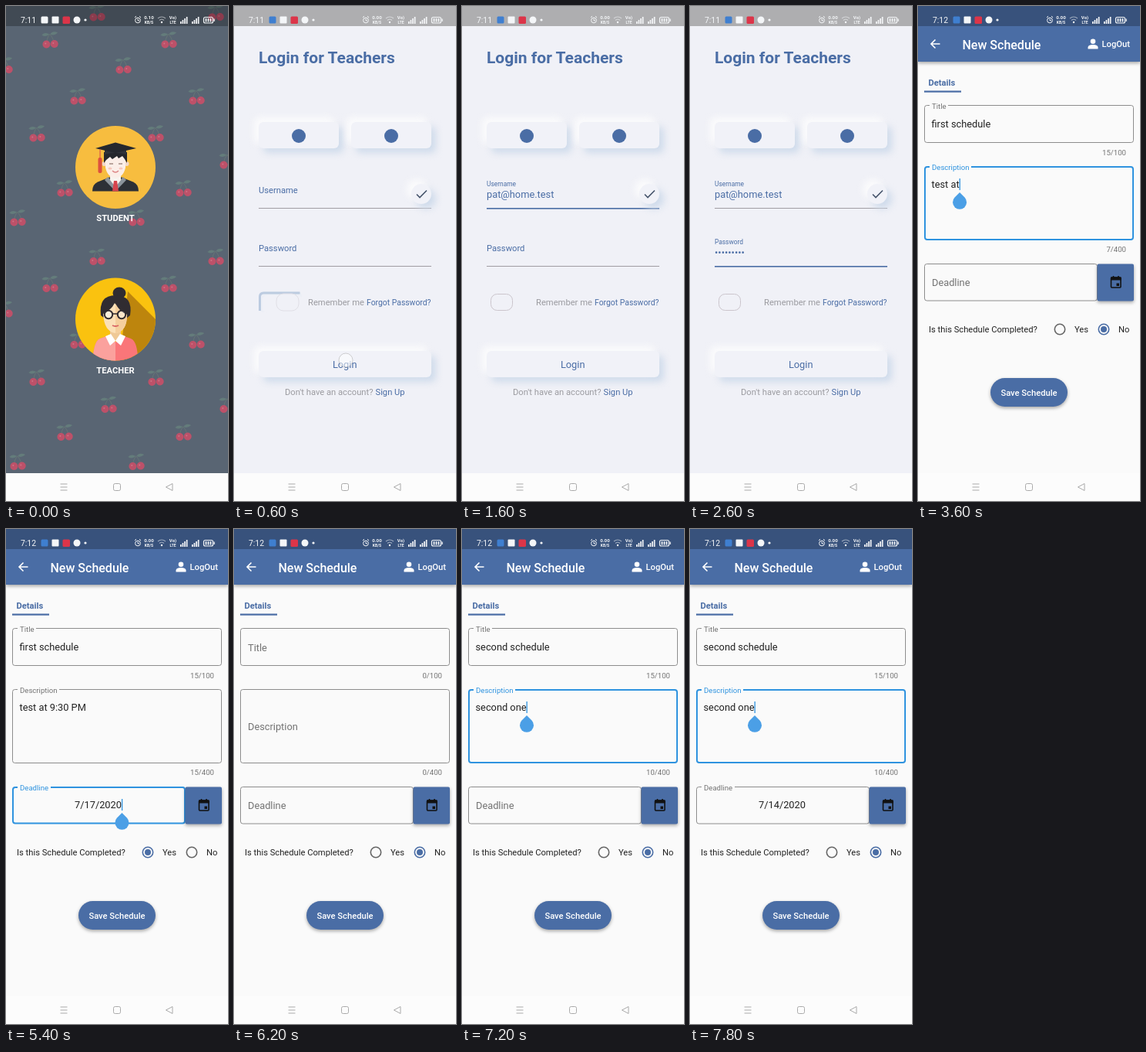
Recreate the animation shown at these times as an HTML page. Size 288 by 640 pixels, loop 8000 ms.

```html
<!DOCTYPE html>
<html lang="en">
<head>
<meta charset="utf-8">
<title>Schedule app demo</title>
<style>
  html, body { margin: 0; width: 100%; height: 100%; overflow: hidden; background: #fafafa; }
  svg { display: block; width: 100vw; height: 100vh; }
  text { font-family: Roboto, sans-serif; white-space: pre; }
  .soft { filter: blur(5px); }
  .lift { filter: drop-shadow(0 2px 2px #0005); }
</style>
</head>
<body>
<svg id="stage" viewBox="0 0 288 640" preserveAspectRatio="none"></svg>
<script>
const STEP = 200, LOOP = 8000;
const BLUE = '#4a6da5', FOCUS = '#2f93df', PICKER = '#2196f3', PAGE = '#fafafa', INK = '#222';

// Each row applies its changes from the given time on.
const TIMELINE = [
  [0, { screen: 'home', clock: '7:11', rate: '0.10' }],
  [400, { touch: true }],
  [600, { screen: 'login', rate: '0.00', toggle: true, user: '', pass: 0 }],
  [800, { touch: false, toggle: false }],
  [1000, { focus: 'user' }],
  [1200, { user: 'pat' }],
  [1400, { user: 'pat@hom' }],
  [1600, { user: 'pat@home.test' }],
  [1800, { focus: 'pass' }],
  [2000, { pass: 3 }],
  [2200, { pass: 6 }],
  [2400, { pass: 9 }],
  [3000, { screen: 'form', clock: '7:12', focus: '', title: '', about: '', date: '', done: false }],
  [3200, { focus: 'title', title: 'first' }],
  [3400, { title: 'first schedule ' }],
  [3600, { focus: 'about', about: 'test at' }],
  [3800, { about: 'test at 9:30' }],
  [4000, { about: 'test at 9:30 PM' }],
  [4200, { focus: 'date', keypad: 433 }],
  [4400, { day: 15, dim: .46, keypad: 469 }],
  [4600, { dim: .54, keypad: 0 }],
  [4800, { day: 17 }],
  [5000, { day: 0, date: '7/17/2020' }],
  [5200, { done: true }],
  [5800, { focus: '', title: '', about: '', date: '', done: false }],
  [6400, { focus: 'title', title: 'second' }],
  [6600, { title: 'second schedule' }],
  [6800, { focus: 'about' }],
  [7000, { about: 'second' }],
  [7200, { about: 'second one' }],
  [7400, { day: 15 }],
  [7600, { day: 14 }],
  [7800, { day: 0, date: '7/14/2020' }]
];

const stateAt = time => Object.assign({}, ...TIMELINE.filter(row => row[0] <= time).map(row => row[1]));

const range = n => [...Array(n).keys()];
const rect = (x, y, w, h, fill, r = 0, more = '') =>
  `<rect x="${x}" y="${y}" width="${w}" height="${h}" rx="${r}" fill="${fill}" ${more}/>`;
const circle = (x, y, r, fill, more = '') => `<circle cx="${x}" cy="${y}" r="${r}" fill="${fill}" ${more}/>`;
const ellipse = (x, y, rx, ry, fill) => `<ellipse cx="${x}" cy="${y}" rx="${rx}" ry="${ry}" fill="${fill}"/>`;
const shape = (d, fill) => `<path d="${d}" fill="${fill}"/>`;
const line = (d, color, width = 1) => `<path d="${d}" fill="none" stroke="${color}" stroke-width="${width}"/>`;
const text = (x, y, size, fill, label, weight = 400, more = '') =>
  `<text x="${x}" y="${y}" font-size="${size}" fill="${fill}" font-weight="${weight}" ${more}>${label}</text>`;
const MIDDLE = 'text-anchor="middle"', END = 'text-anchor="end"';

const pen = document.createElement('canvas').getContext('2d');
pen.font = '12.8px Roboto, sans-serif';
const inputWidth = value => pen.measureText(value).width;

function statusBar({ clock, rate, screen }) {
  const white = '#f4f6f8';
  const bars = x => range(4).map(i => rect(x + i * 2.6, 20 - i * 2, 1.7, 3 + i * 2, white)).join('');
  return text(19, 22, 10.4, white, clock) +
    rect(45.5, 13.5, 9, 9, screen === 'home' ? white : '#3f7fd0', 1.5) +
    rect(59.5, 13.5, 9, 9, white, 1) + rect(73.5, 13.5, 9.5, 9.5, '#dc3549', 1.5) +
    circle(92, 18, 4.5, white) + circle(103, 18, 1.6, white) +
    circle(171, 18.5, 3.4, 'none', `stroke="${white}"`) +
    line('M171 16.5v2.3h2M167 15l2-2M175 15l-2-2', white) +
    text(185.5, 17.4, 6.2, white, rate, 700, MIDDLE) + text(185.5, 23, 5, white, 'KB/S', 700, MIDDLE) +
    line('M197 16q5-4 10 0M199 18.5q3-2.5 6 0', white + '88', 1.2) + circle(202, 21, 1.2, white) +
    text(216.5, 17.4, 6, white, 'Vo)', 700, MIDDLE) + text(216.5, 23, 5, white, 'LTE', 700, MIDDLE) +
    bars(226) + bars(241) +
    rect(256.5, 14.5, 12, 7.5, 'none', 2, `stroke="${white}" stroke-width="1.2"`) +
    rect(269.5, 16.5, 1.3, 3.5, white) + line('M259.5 16v4.5M262.5 16v4.5M265.5 16v4.5', white, 1.7);
}

function navBar(opacity = 1) {
  return rect(0, 604, 288, 36, '#fcfcfc', 0, `opacity="${opacity}"`) +
    line('M70.5 618h9M70.5 622h9M70.5 626h9M216 617.5v9l-8.5-4.5z', '#aaa') +
    rect(139.5, 617.5, 9, 9, 'none', 2, 'stroke="#aaa"');
}

const touchRing = () => circle(145, 458, 9, '#fff8', 'stroke="#aaa8"');

/* Home */

const CHERRY_TILE = [[57, 43], [118, 8], [-2, 76], [93, 116], [40, 164], [133, 199], [76, 235], [15, 273]];

function cherries() {
  const one = (x, y) => `<g transform="translate(${x} ${y + 1.5}) rotate(-5)">` +
    shape('M0-8q-5-4-10 0q5 4 10 0zM1-8q4-5 10-1q-5 4-10 1z', '#647c7b') +
    line('M-4.5 4q0-7 5-12q4 5 4.5 12', '#667575') +
    circle(-5, 4.6, 5, '#bd5169') + circle(5.3, 5, 5, '#bd5169') +
    circle(-6, 3.4, 1, '#cf7485') + circle(4, 3.8, 1, '#cf7485') + '</g>';
  return range(6).map(i => CHERRY_TILE.map(([x, y]) =>
    one(x + i % 3 * 154, y + (i > 2) * 315.5)).join('')).join('');
}

function student() {
  return ellipse(142, 208.5, 52, 53.5, '#f7bd3f') +
    shape('M112 239.5q0-9 7-12l15-6h16l15 6q7 3 7 12z', '#2d3036') +
    shape('M132 221l10 10 10-10 4 4-14 14.5-14-14.5z', '#8b939b') +
    shape('M135 219h14v6l-7 9-7-9z', '#f8f4ef') +
    shape('M140 226h4l2 13.5h-8z', '#d6444d') +
    circle(127.5, 204, 3, '#f3d8c8') + circle(156.5, 204, 3, '#f3d8c8') +
    shape('M129 191h26v18q-3 13-13 13t-13-13z', '#fbeee8') +
    shape('M127 203v-14h30v14l-3-5-3-4-5 3-2-3-6 4-3-3-5 4z', '#25272c') +
    shape('M128 184h28v8q-14-4-28 0z', '#30333a') + shape('M116 184l26-7.5 27 7.5-27 6z', '#25282e') +
    line('M122 185v12', '#d6444d') + rect(119.5, 196, 5, 20, '#dd503e', 2) +
    line('M134 204h5M146 204h5', '#7b5a50', 1.2) + line('M138 213q4 4 8 0', '#d88', 1.4) +
    ellipse(135, 210, 2.5, 1.5, '#f6c8bd') + ellipse(149, 210, 2.5, 1.5, '#f6c8bd');
}

function teacher() {
  const skin = '#fbe0b7', shade = '#efc996', hair = '#302c31';
  return `<clipPath id="disc"><ellipse cx="142" cy="405" rx="52" ry="53.5"/></clipPath><g clip-path="url(#disc)">` +
    rect(90, 351, 104, 108, '#fac20f') + shape('M158 369l48 48v52h-60z', '#bd850d') +
    ellipse(147, 371, 8.5, 7.5, hair) +
    shape('M123 400q-3-26 19-26q23 0 19 26l-5 4h-28z', hair) +
    rect(135, 411, 14, 22, shade) +
    shape('M126 397q10-3 15-13q7 13 16 15q0 22-15 24q-15-2-16-26z', skin) +
    shape('M142 385q7 12 15 14q0 22-15 24z', '#f5cf9c') +
    shape('M113 459q0-25 9-29l14-5 6 10 6-10 14 5q9 4 9 29z', '#fa7679') +
    shape('M113 459q0-25 9-29l14-5 6 10v24z', '#fba19d') +
    shape('M136 424l6 9-7 6-6-12zM148 424l-6 9 7 6 6-12z', '#fff') +
    circle(133, 399, 5.2, '#fff7', `stroke="${hair}" stroke-width="2"`) +
    circle(150, 399, 5.2, '#fff7', `stroke="${hair}" stroke-width="2"`) +
    line('M138 398h7M123 397h5M155 397h5', hair, 1.6) +
    line('M138 413q4 2 8 0', '#d96565', 1.8) + '</g>';
}

function home(s) {
  return rect(0, 0, 288, 640, '#596573') + cherries() + student() + teacher() +
    text(142, 278, 11.2, '#fff', 'STUDENT', 700, MIDDLE) +
    text(142, 475, 11.2, '#fff', 'TEACHER', 700, MIDDLE) +
    rect(0, 0, 288, 26, '#0004') + (s.touch ? touchRing() : '');
}

/* Login */

const LIGHT = '#f0f1f7';

const raised = (x, y, w, h, r) =>
  rect(x + 6, y + 6, w, h, '#cfdbeb', r, 'class="soft"') +
  rect(x - 6, y - 6, w, h, '#fbfbfc', r, 'class="soft"') + rect(x, y, w, h, '#f1f2f8', r);

function loginField(y, label, value, focused) {
  const floating = value || focused;
  return text(32, floating ? y - 29 : y - 20, floating ? 8.4 : 11.2, BLUE, label) +
    text(32, y - 14, 12.8, BLUE, value) +
    rect(32, y - 1, 224, focused ? 1.6 : 1, focused ? BLUE : '#a09da3');
}

function login(s) {
  const toggle = s.toggle
    ? rect(32, 369, 56, 27, '#eceff6', 6) + line('M33.5 394v-18q0-5 5-5h47', '#bccbe0', 3) +
      rect(37, 374, 52, 23, LIGHT, 6) + rect(55, 372, 29, 22, LIGHT, 9, 'stroke="#e0dfe6"')
    : rect(37.5, 372.5, 28, 21, LIGHT, 8, 'stroke="#cbc5cc"');
  return rect(0, 0, 288, 640, LIGHT) + rect(0, 0, 288, 26, '#aeaeb0') +
    text(32, 73.5, 21, BLUE, 'Login for Teachers', 700) +
    raised(32, 150, 104, 34, 6) + circle(84, 168, 9, BLUE) +
    raised(152, 150, 104, 34, 6) + circle(204, 168, 9, BLUE) +
    loginField(262, 'Username', s.user, s.focus === 'user') +
    raised(230, 230, 26, 26, 13) + line('M237 243.5l4 4 9-9', '#46546b', 1.6) +
    loginField(337, 'Password', '•'.repeat(s.pass), s.focus === 'pass') + toggle +
    text(96, 387, 11.2, '#9b9ba0', 'Remember me') + text(172, 387, 10.4, BLUE, 'Forgot Password?') +
    raised(32, 446, 224, 34, 6) + text(143.7, 468, 12.8, BLUE, 'Login', 400, MIDDLE) +
    text(66, 502.5, 11.2, '#9b9ba0', "Don't have an account?") + text(183.5, 502.5, 11.2, BLUE, 'Sign Up') +
    (s.touch ? touchRing() : '');
}

/* Schedule form */

function outlined(y, w, h, label, labelWidth, value, focused) {
  const color = focused ? FOCUS : '#8c8c8c', inset = focused ? 1 : .5;
  const frame = rect(8 + inset, y + inset, w - 2 * inset, h - 2 * inset, 'none', 3,
    `stroke="${color}" stroke-width="${inset * 2}"`);
  return frame + (value || focused
    ? rect(15, y - 2, labelWidth, 5, PAGE) + text(18, y + 5.2, 9.6, focused ? FOCUS : '#737373', label)
    : text(18, y + h / 2 + 5, 12.8, '#737373', label));
}

const caret = (x, y) => rect(x - .5, y - 12, 1.3, 15, FOCUS) +
  shape(`M${x} ${y + 6}l6.5 6.5a9 9 0 1 1-13 0z`, '#4b9fe6');

const radio = (x, on) => circle(x, 418, 6.7, 'none', `stroke="${on ? BLUE : '#666'}" stroke-width="1.6"`) +
  (on ? circle(x, 418, 4, BLUE) : '');

function keypad(top) {
  const rows = ['123', '456', '789', '/0.'];
  const keys = rows.map((row, r) => [...row].map((key, c) =>
    text(37 + c * 71, 35.5 + r * 40.3, 24, '#888', key === '/' ? '/ :' : key, 400, MIDDLE)).join('')).join('');
  return `<g transform="translate(0 ${top})">` + rect(0, 0, 288, 171, PAGE) + keys +
    line('M246 26h10M243 65v4h16v-4M241 107l6-7h13v14h-13zM250 104l6 6M256 104l-6 6', '#888', 1.5) +
    rect(234, 133, 33, 24, '#8fb9ef', 5) + line('M243 145l5 5 9-10', '#fff', 2.5) + '</g>';
}

function picker(day) {
  const date = new Date(2020, 6, day);
  const name = ['Sun', 'Mon', 'Tue', 'Wed', 'Thu', 'Fri', 'Sat'][date.getDay()];
  const colX = i => 37 + i * 35.6;
  const days = range(31).map(i => {
    const x = colX((i + 3) % 7), y = 235 + Math.floor((i + 3) / 7) * 27.4, chosen = i + 1 === day;
    return (chosen ? circle(x, y, 13.6, PICKER) : '') +
      text(x, y + 3.5, 9.6, chosen ? '#fff' : INK, i + 1, 400, MIDDLE);
  }).join('');
  return rect(12, 52, 264, 370, '#0007', 3, 'class="soft"') + rect(12, 46, 264, 370, '#fff', 3) +
    shape('M12 144.5V49q0-3 3-3h258q3 0 3 3v95.5z', PICKER) +
    text(32, 66.5, 8, '#e5f3ff', 'SELECT DATE', 400, 'letter-spacing="1.2"') +
    text(32, 129, 27.2, '#fff', `${name}, Jul ${day}`) +
    shape('M239.5 124l9-9 3.5 3.5-9 9h-3.5zM249.5 114l2-2 3.5 3.5-2 2z', '#fff') +
    text(32, 169.5, 11.2, '#666', 'July 2020', 500) + shape('M88 164h8l-4 4z', '#666') +
    line('M216.5 161.5l-4.5 4.5 4.5 4.5M250 161.5l4.5 4.5-4.5 4.5', '#555', 1.6) +
    [...'SMTWTFS'].map((d, i) => text(colX(i), 207.5, 9.6, '#777', d, 400, MIDDLE)).join('') + days +
    text(162, 398.5, 11.2, PICKER, 'CANCEL', 500) + text(235.5, 398.5, 11.2, PICKER, 'OK', 500);
}

function calendarButton() {
  return rect(232.5, 333.5, 47.5, 48, BLUE, 2, 'class="lift"') +
    rect(250.5, 351, 12.5, 13, 'none', 1, 'stroke="#111" stroke-width="1.6"') +
    rect(250, 350.5, 13.5, 4, '#111') + line('M253.5 349v3M260 349v3', '#111', 1.6) +
    rect(257.5, 358.5, 3.5, 3.5, '#111');
}

function form(s) {
  const is = name => s.focus === name;
  const caretAt = {
    title: [18 + inputWidth(s.title), 156],
    about: [18 + inputWidth(s.about), 235],
    date: [120 + inputWidth(s.date) / 2, 361]
  }[s.focus];
  const page = rect(0, 0, 288, 640, PAGE) +
    rect(0, 26, 288, 46, BLUE, 0, 'class="lift"') + rect(0, 0, 288, 26, '#38527c') +
    line('M28.5 49H17M22.5 43.5L17 49l5.5 5.5', '#fff', 1.6) +
    text(57.5, 55.5, 16, '#fff', 'New Schedule', 500) +
    circle(227, 45.8, 3.3, '#fff') + shape('M220.5 55.5v-2q0-3.5 6.5-3.5t6.5 3.5v2z', '#fff') +
    text(238.5, 53, 11.2, '#fff', 'LogOut', 500) +
    text(13.5, 103, 11.2, BLUE, 'Details', 700) + rect(8, 109.5, 48, 2.2, BLUE) +
    outlined(128, 272, 49, 'Title', 24, s.title, is('title')) + text(17.5, 156.5, 12.8, INK, s.title) +
    text(270, 192.5, 9.6, '#737373', s.title.length + '/100', 400, END) +
    outlined(207, 272, 96, 'Description', 54, s.about, is('about')) + text(17.5, 235, 12.8, INK, s.about) +
    text(270, 318, 9.6, '#737373', s.about.length + '/400', 400, END) +
    outlined(333, 225, 48.5, 'Deadline', 43, s.date, is('date')) +
    text(119.5, 361, 12.8, INK, s.date, 400, MIDDLE) + calendarButton() +
    text(14, 422, 11.2, INK, 'Is this Schedule Completed?') +
    radio(184, s.done) + text(203, 422, 11.2, INK, 'Yes') +
    radio(241, !s.done) + text(260, 422, 11.2, INK, 'No') +
    rect(94, 481, 100, 37, BLUE, 18.5, 'class="lift"') +
    text(144, 503.5, 11.2, '#fff', 'Save Schedule', 500, MIDDLE) +
    (caretAt && !s.day ? caret(...caretAt) : '');
  const shadeTo = s.keypad || 604;
  return page + (s.keypad ? keypad(s.keypad) : '') + (s.day
    ? rect(0, 0, 288, shadeTo, '#000', 0, `opacity="${s.dim}"`) +
      rect(0, shadeTo, 288, 604 - shadeTo, '#000', 0, 'opacity=".38"') + picker(s.day)
    : '');
}

/* Playback */

const SCREENS = { home, login, form };
const stage = document.getElementById('stage');
let shown = -1;

function play() {
  const time = Math.floor(performance.now() % LOOP / STEP) * STEP;
  if (time !== shown) {
    const s = stateAt(time);
    stage.innerHTML = SCREENS[s.screen](s) + navBar(s.keypad ? .25 : 1) + statusBar(s);
    shown = time;
  }
  requestAnimationFrame(play);
}
play();
</script>
</body>
</html>
```
